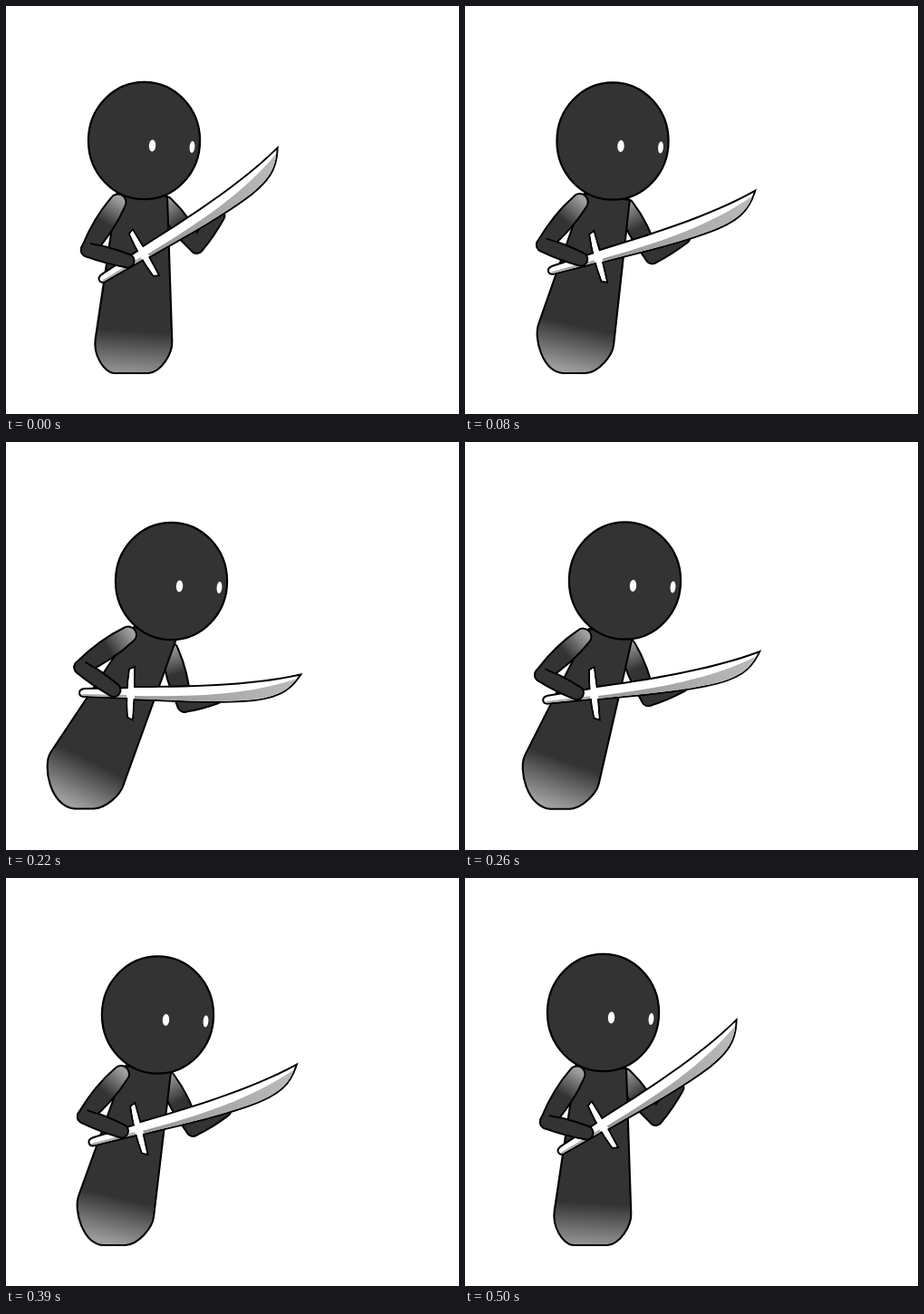
Recreate the animation shown at these times as an HTML page with a canvas. Size 500 px wide and 450 px high, loop 0.58 s.

```html
<!DOCTYPE html>
<html lang="en">
<head>
<meta charset="utf-8">
<title>Sword stance</title>
<style>
  html, body { margin: 0; width: 100%; height: 100%; overflow: hidden; background: #fff; }
  canvas { display: block; }
</style>
</head>
<body>
<canvas id="stage" width="500" height="450"></canvas>
<script>
const ctx = document.getElementById('stage').getContext('2d');
const DARK = '#333', LIGHT = '#a0a0a0', LOOP = 580;

// Each step: start time, lean (0 upright, 1 full lunge), head centre
const steps = [
  [0, 0, 152.5, 148.5],
  [80, 0.48, 163, 149],
  [160, 1, 182.5, 153.5],
  [260, 0.75, 176.5, 153],
  [340, 0.5, 167.5, 151],
  [420, 0.25, 158.5, 149],
  [500, 0, 152.5, 148.5]
];

// Points at lean 0, 0.5 and 1
const joints = {
  neckL: [123, 204, 132, 207, 142, 203],
  neckR: [178, 210, 182, 214, 188, 217],
  hipL: [98.7, 367, 80.3, 350, 49.5, 342],
  hipR: [183.3, 370, 163, 374, 129, 380],
  footL: [119, 405, 107, 405, 76, 404.5],
  footR: [157, 405, 132, 405, 97, 404.5],
  hilt: [151.7, 273, 146.5, 277, 138, 277],
  nearShoulder: [123.5, 216.5, 127, 216, 135, 212.5],
  nearElbow: [90.5, 269, 86.5, 263, 83, 248.5],
  nearHand: [134, 281, 127.5, 279, 119, 273.5],
  farShoulder: [176, 219, 178, 222, 181, 230],
  farElbow: [210.5, 265, 206.5, 277, 197, 290],
  farHand: [234, 231, 241, 256, 232, 281]
};

const blade = new Path2D('M0,-6 C60,-6 130,-7 185,-19 C174,-3 161,6 123,8 C80,10.5 40,7 0,6 Z');
const grip = new Path2D('M0,-5 L-51,-4 Q-56,-3.5 -56,-.5 Q-56,3 -51,3 L0,5 Z');
const guard = new Path2D('M-1,-26 L3,-27.5 Q3.5,0 1,28 L-3,26 Q-5,0 -1,-26 Z');
const bladeShade = new Path2D('M4,3 C70,4 130,2 183,-16 L190,20 L4,20 Z');
const gripShade = new Path2D('M-54,1 L-5,2 V6 H-54 Z');

// Quadratic path through the three key positions
function poseAt(t) {
  const a = (1 - t) * (1 - 2 * t), b = 4 * t * (1 - t), c = t * (2 * t - 1);
  const pose = {};
  for (const [name, p] of Object.entries(joints)) {
    pose[name] = [0, 1].map(i => a * p[i] + b * p[i + 2] + c * p[i + 4]);
  }
  return pose;
}

const mix = (p, q, k) => [p[0] + (q[0] - p[0]) * k, p[1] + (q[1] - p[1]) * k];

function toward(p, q, distance) {
  return mix(p, q, distance / Math.hypot(q[0] - p[0], q[1] - p[1]));
}

function fade(from, to, first, last) {
  const g = ctx.createLinearGradient(...from, ...to);
  g.addColorStop(0, first);
  g.addColorStop(1, last);
  return g;
}

function outline(path, fill, width = 2.1) {
  ctx.fillStyle = fill;
  ctx.fill(path);
  ctx.strokeStyle = '#000';
  ctx.lineWidth = width;
  ctx.stroke(path);
}

// Strokes all shapes before filling them, so that only the joint outline shows
function merge(shapes, fills) {
  ctx.strokeStyle = '#000';
  ctx.lineWidth = 4;
  shapes.forEach(shape => ctx.stroke(shape));
  shapes.forEach((shape, i) => {
    ctx.fillStyle = fills[i];
    ctx.fill(shape);
  });
}

function ellipse(x, y, rx, ry, tilt = 0) {
  const path = new Path2D();
  path.ellipse(x, y, rx, ry, tilt, 0, 2 * Math.PI);
  return path;
}

// Round-ended limb whose sides swell by the given bulge
function limb(p, q, rp, rq, bulge) {
  const angle = Math.atan2(q[1] - p[1], q[0] - p[0]), quarter = Math.PI / 2;
  const nx = Math.sin(angle) * bulge, ny = -Math.cos(angle) * bulge;
  const [mx, my] = mix(p, q, 0.45);
  const path = new Path2D();
  path.arc(...p, rp, angle + quarter, angle + 3 * quarter);
  path.quadraticCurveTo(mx + nx, my + ny,
    q[0] + rq * Math.sin(angle), q[1] - rq * Math.cos(angle));
  path.arc(...q, rq, angle - quarter, angle + quarter);
  path.quadraticCurveTo(mx - nx, my - ny,
    p[0] - rp * Math.sin(angle), p[1] + rp * Math.cos(angle));
  path.closePath();
  return path;
}

function arm(shoulder, elbow, hand) {
  merge(
    [limb(shoulder, elbow, 8, 6.7, 12.5), limb(elbow, hand, 6.7, 6.5, 8.5)],
    [fade(toward(shoulder, elbow, -4), toward(shoulder, elbow, 27), LIGHT, DARK), DARK]
  );
}

function body(p) {
  const depth = 405 - p.hipL[1];
  const path = new Path2D();
  path.moveTo(...p.neckL);
  path.lineTo(...p.hipL);
  path.bezierCurveTo(...toward(p.hipL, p.neckL, -18),
    p.footL[0] - (depth - 20) * 0.63, p.footL[1] - 2, ...p.footL);
  path.lineTo(...p.footR);
  path.bezierCurveTo(p.footR[0] + 14, p.footR[1] - 1,
    ...toward(p.hipR, p.neckR, -0.4 * (405 - p.hipR[1])), ...p.hipR);
  path.lineTo(...p.neckR);
  path.closePath();
  const hip = mix(p.hipL, p.hipR, 0.5), neck = mix(p.neckL, p.neckR, 0.5);
  outline(path, fade(toward(hip, neck, 10), toward(hip, neck, -42), DARK, LIGHT));
}

function shade(shape, area, color) {
  ctx.save();
  ctx.clip(shape);
  ctx.fillStyle = color;
  ctx.fill(area);
  ctx.restore();
}

function sword([x, y], angle) {
  ctx.save();
  ctx.translate(x, y);
  ctx.rotate(angle * Math.PI / 180);
  ctx.lineJoin = 'miter';
  merge([grip, blade, guard], ['#fff', '#fff', '#fff']);
  shade(blade, bladeShade, fade([10, 0], [185, 0], '#999', '#bbb'));
  shade(grip, gripShade, '#aaa');
  ctx.fillStyle = '#fff';
  ctx.fill(guard);
  ctx.restore();
}

// Short fold inside the elbow, in line with the top of the forearm
function crease([x, y], hand) {
  ctx.save();
  ctx.translate(x, y);
  ctx.rotate(Math.atan2(hand[1] - y, hand[0] - x));
  ctx.strokeStyle = '#000';
  ctx.lineWidth = 1.8;
  ctx.beginPath();
  ctx.moveTo(1, -7.5);
  ctx.lineTo(11, -8);
  ctx.stroke();
  ctx.restore();
}

function head(x, y) {
  outline(ellipse(x, y, 61.6, 64.7), DARK, 2.2);
  ctx.fillStyle = '#fff';
  ctx.fill(ellipse(x + 9, y + 5.5, 3.7, 6.5, 0.05));
  ctx.fill(ellipse(x + 53, y + 7, 2.9, 6.5, 0.08));
}

function draw(now) {
  const time = now % LOOP;
  const [, lean, headX, headY] = steps.findLast(step => step[0] <= time);
  const p = poseAt(lean);
  ctx.fillStyle = '#fff';
  ctx.fillRect(0, 0, 500, 450);
  ctx.lineCap = ctx.lineJoin = 'round';
  arm(p.farShoulder, p.farElbow, p.farHand);
  body(p);
  sword(p.hilt, -32 * (1 - lean));
  arm(p.nearShoulder, p.nearElbow, p.nearHand);
  crease(p.nearElbow, p.nearHand);
  head(headX, headY);
  requestAnimationFrame(draw);
}

draw(0);
</script>
</body>
</html>
```
